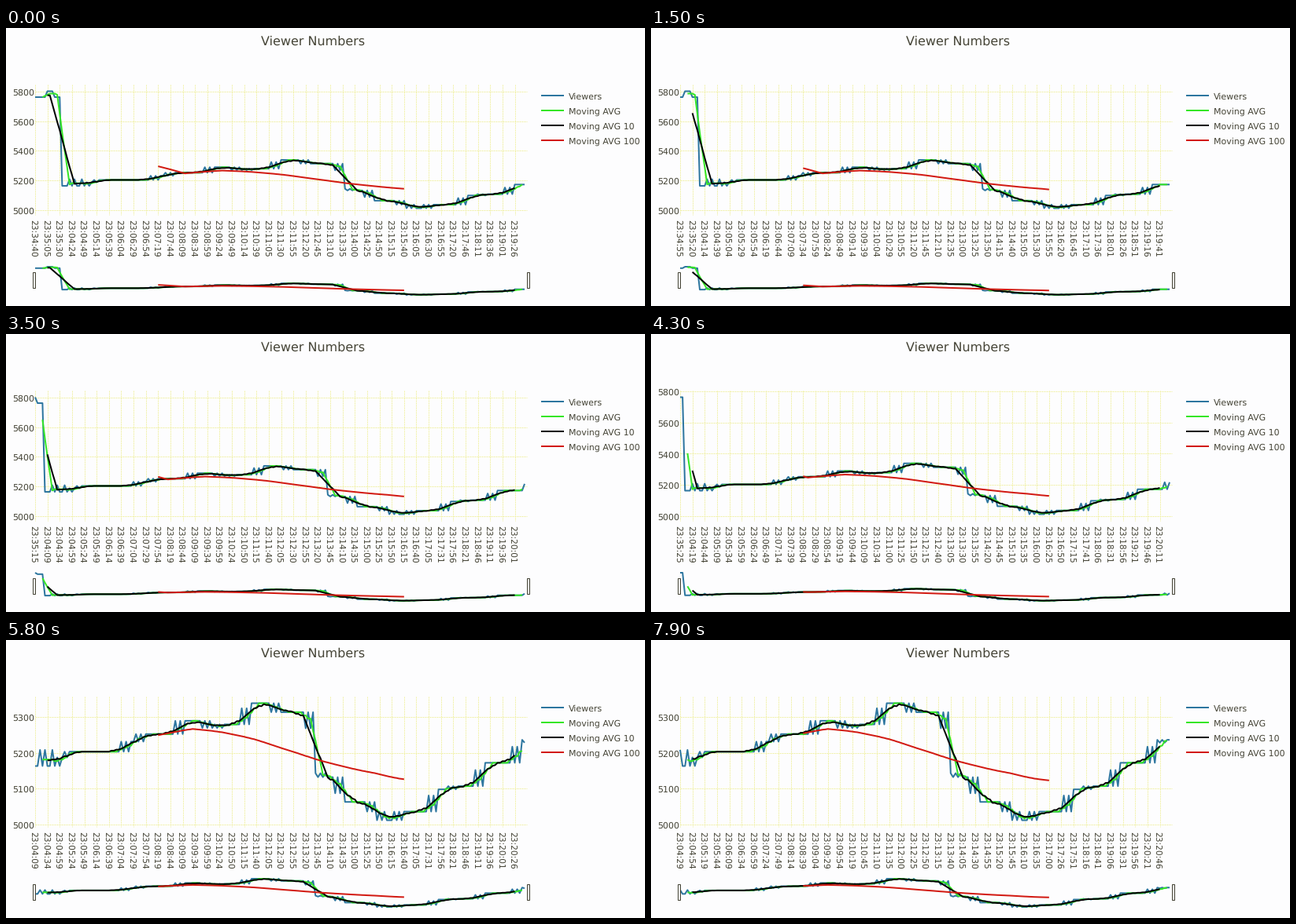
A matplotlib script that plays this animation: 812 by 354 pixels, repeating every 8 s.

```python
import numpy as np
import matplotlib.pyplot as plt
from matplotlib.animation import FuncAnimation
from matplotlib.patches import Rectangle

plt.rcParams["font.family"] = "DejaVu Sans"
plt.rcParams["text.hinting"] = "none"

W, H, DPI = 812, 354, 72          # at 72 dpi one point is one pixel
FRAMES, INTERVAL = 80, 100
WINDOW, LABEL_STEP = 200, 5
LEFT, RIGHT = 37, 659             # first and last sample
TOP, BOTTOM = 72.2, 237.8         # plot area
HIGH, LOW = 80.5, 229.5           # largest and smallest value in the plot
MINI_HIGH, MINI_LOW = 304, 340    # the same in the overview strip

PAPER, INK, GRID = "#fdfdfe", "#454436", "#f1f1a6"
BLUE, GREEN, BLACK, RED = "#2d769f", "#35e626", "#000000", "#d21a12"

RESTART = 11                      # the recording resumes here after a break
# key points of the viewer count: first sample of a plateau, level
PLATEAUS = [
    (11, 5163), (18, 5208), (20, 5163), (23, 5187), (26, 5203), (51, 5231),
    (57, 5252), (73, 5289), (84, 5269), (89, 5279), (100, 5338), (112, 5313),
    (126, 5143), (131, 5132), (138, 5063), (151, 5036), (155, 5012),
    (162, 5036), (176, 5098), (184, 5107), (195, 5172), (210, 5228),
    (214, 5236),
]
FLICKER_SPAN, FLICKER_MAX = 5, 45


def build_viewers(count):
    values = np.full(count, 5762.0)
    values[5:8] += 40
    ends = [start for start, _ in PLATEAUS[1:]] + [count]
    levels = [level for _, level in PLATEAUS]
    for (start, level), end, after in zip(PLATEAUS, ends, levels[1:] + levels[-1:]):
        values[start:end] = level
        # before each change the count flickers towards the next level
        jump = np.clip(after - level, -FLICKER_MAX, FLICKER_MAX)
        for back in range(2, min(FLICKER_SPAN, end - start) + 1, 2):
            values[end - back] += jump
    return values


def clock(p):
    if p < RESTART:
        sec = 34 * 60 + 40 + 5 * p
    else:
        sec = int(4 * 60 + 4 + 5.0125 * (p - RESTART))
    return f"23:{sec // 60:02d}:{sec % 60:02d}"


def rolling(values, n):
    return np.convolve(values, np.ones(n) / n, mode="valid")


def sample_x(i):
    return LEFT + np.asarray(i) * (RIGHT - LEFT) / (WINDOW - 1)


def scale(values, lo, hi, y_lo, y_hi):
    return y_lo + (np.asarray(values) - lo) / (hi - lo) * (y_hi - y_lo)


viewers = build_viewers(WINDOW + 16)

fig = plt.figure(figsize=((W + 0.01) / DPI, (H + 0.01) / DPI), dpi=DPI,
                 facecolor=PAPER)
ax = fig.add_axes([0, 0, 1, 1])
ax.set_xlim(0, W)
ax.set_ylim(H, 0)
ax.axis("off")


def grid_line(xs, ys):
    return ax.plot(xs, ys, color=GRID, lw=1, ls=(0, (2, 1)), zorder=1)[0]


ax.text(390.5, 22, "Viewer Numbers", size=16, color=INK, ha="center")

# name, colour, averaging length, offset of the average from its first sample
SERIES = [
    ("Viewers", BLUE, 1, 0),
    ("Moving AVG", GREEN, 5, 3),
    ("Moving AVG 10", BLACK, 10, 5),
    ("Moving AVG 100", RED, 100, 50),
]
main_lines, mini_lines = [], []
for k, (name, color, _, _) in enumerate(SERIES):
    y = 86.5 + 19 * k
    ax.plot([680, 709], [y, y], color=color, lw=2, solid_capstyle="butt")
    ax.text(715, y + 4, name, size=11, color=INK)
    style = dict(color=color, lw=2, zorder=3 + k, solid_capstyle="butt")
    main_lines += ax.plot([], [], **style)
    mini_lines += ax.plot([], [], **style)

for x in (34, 662):
    ax.add_patch(Rectangle((x, 311.5), 2.5, 20, fc=PAPER, ec=INK, lw=1,
                           zorder=9))

time_labels = []
for i in range(0, WINDOW, LABEL_STEP):
    x = sample_x(i)
    grid_line([x, x], [TOP, BOTTOM])
    time_labels.append(ax.text(x - 2.7, 244.3, "", size=10.6, color=INK,
                               rotation=-90, ha="center", va="top"))

value_ticks = [(grid_line([], []), ax.text(36, 0, "", size=11, color=INK,
                                           ha="right")) for _ in range(6)]


def update(frame):
    shift = (frame + 4) // 5
    data = viewers[shift:shift + WINDOW]
    lo, hi = data.min(), data.max()

    for (_, _, n, offset), main, mini in zip(SERIES, main_lines, mini_lines):
        avg = rolling(data, n)
        xs = sample_x(np.arange(len(avg)) + offset)
        main.set_data(xs, scale(avg, lo, hi, LOW, HIGH))
        mini.set_data(xs, scale(avg, lo, hi, MINI_LOW, MINI_HIGH))

    for k, label in enumerate(time_labels):
        label.set_text(clock(shift + k * LABEL_STEP))

    step = 200 if hi - lo > 500 else 100
    for k, (line, label) in enumerate(value_ticks):
        value = 5000 + step * k
        y = scale(value, lo, hi, LOW, HIGH)
        shown = TOP <= y <= BOTTOM
        line.set_visible(shown)
        label.set_visible(shown)
        line.set_data([LEFT, RIGHT + 3], [y, y])
        label.set_y(y + 5)
        label.set_text(str(value))

    return main_lines + mini_lines + time_labels


anim = FuncAnimation(fig, update, frames=FRAMES, interval=INTERVAL,
                     init_func=lambda: update(0), repeat=True, repeat_delay=0)
plt.show()
```
